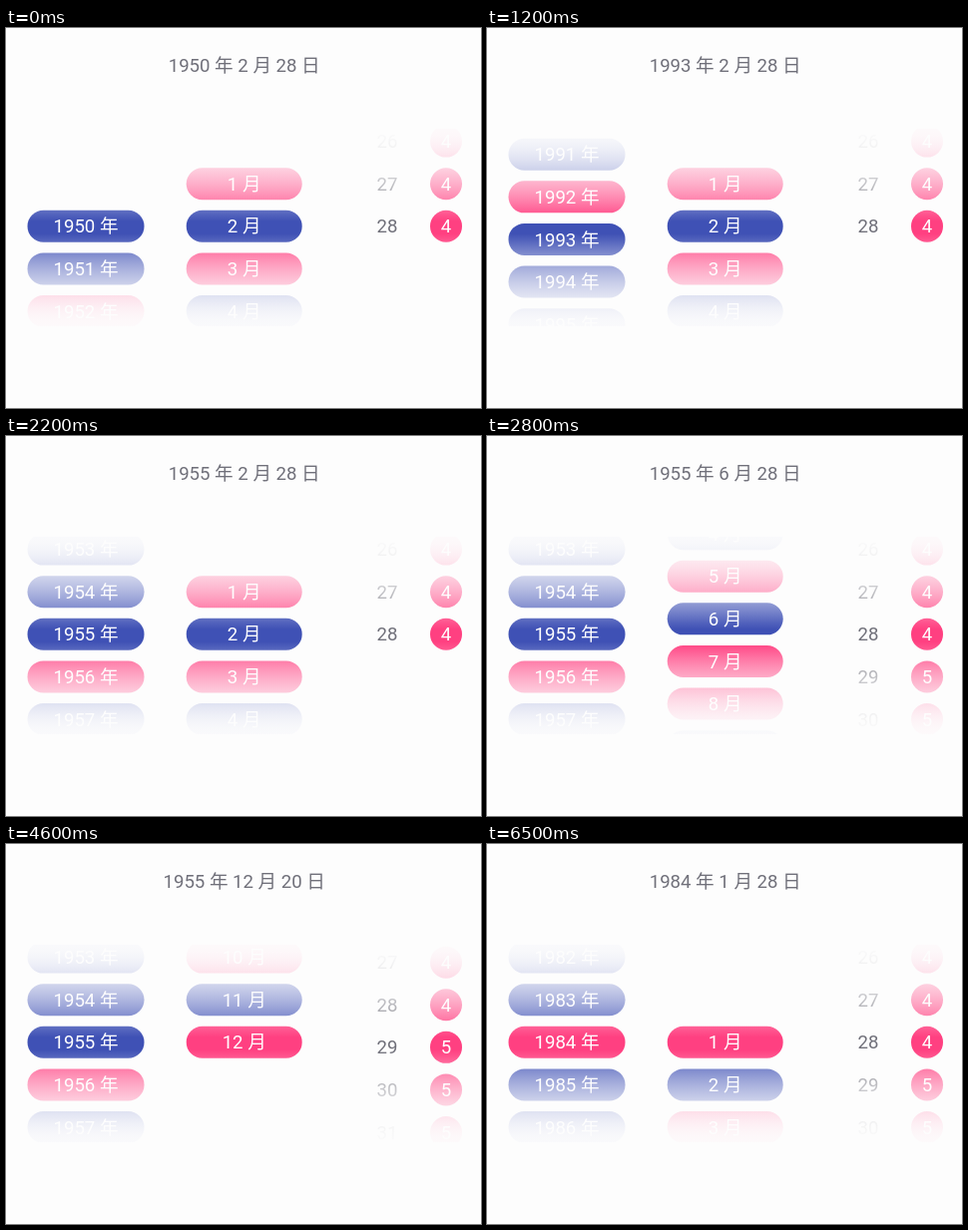
These frames come from a looping animation (476 by 381 pixels, 6.6 s). An HTML page with a canvas:

```html
<!DOCTYPE html>
<html lang="zh-CN">
<head>
<meta charset="utf-8">
<title>日期选择</title>
<style>
html, body { margin: 0; width: 100%; height: 100%; overflow: hidden; background: #fdfdfd; }
canvas { display: block; }
</style>
</head>
<body>
<canvas id="stage" width="476" height="381"></canvas>
<script>
const ctx = document.getElementById('stage').getContext('2d');
const LOOP = 6600, STEP = 100, FLING = 420;
const MID = 198.8, PITCH = 42.6, TOP = 101, HEIGHT = 198, CENTER = 238.7;
const BG = '#fdfdfd', INK = '#70707a', PINK = '#ff4081', BLUE = '#3f51b5';

// Every fling lasts equally long: start ms -> value it settles on
const wheels = {
  year: { from: 1950, flings: { 80: 1971, 620: 1993, 1160: 1976, 1664: 1955, 5357: 1969, 5850: 1984 } },
  month: { from: 2, flings: { 2240: 6, 2727: 12, 4860: 1 } },
  day: { from: 28, flings: { 3790: 20, 4214: 29, 4660: 28 } }
};

const ease = u => u < 0.5 ? 2 * u * u : 1 - 2 * (1 - u) ** 2;
const daysIn = (y, m) => new Date(y, m, 0).getDate();
const isLeap = y => daysIn(y, 2) === 29;

// Current scroll position and the last settled value
function read({ from, flings }, t) {
  let value = from;
  for (const [start, to] of Object.entries(flings)) {
    const u = (t - start) / FLING;
    if (u < 0) break;
    if (u < 1) return { value, pos: value + (to - value) * ease(u) };
    value = to;
  }
  return { value, pos: value };
}

function text(str, x, y, color) {
  ctx.fillStyle = color;
  ctx.fillText(str, x, y + 6.6);
}

function pill(x, y, w, color) {
  ctx.fillStyle = color;
  ctx.beginPath();
  ctx.roundRect(x - w / 2, y - 16, w, 32, 16);
  ctx.fill();
}

function column(pos, min, max, drawRow) {
  const first = Math.max(min, Math.floor(pos) - 3);
  const last = Math.min(max, Math.ceil(pos) + 3);
  for (let n = first; n <= last; n++) drawRow(n, MID + (n - pos) * PITCH);
}

// Veil that hides rows with growing distance from the middle
const veil = ctx.createLinearGradient(0, TOP, 0, TOP + HEIGHT);
for (let s = 0; s <= 1; s += 1 / 32) {
  const u = Math.max(0, Math.abs(2 * s - 1) * 1.08 - 0.08);
  veil.addColorStop(s, `rgba(253,253,253,${0.98 * (1 - (1 - u) ** 1.8)})`);
}

function draw(t) {
  const year = read(wheels.year, t);
  const month = read(wheels.month, t);
  const day = read(wheels.day, t);

  ctx.fillStyle = BG;
  ctx.fillRect(0, 0, 476, 381);
  ctx.font = '18.6px Roboto, "Noto Sans CJK SC", "Noto Sans CJK", sans-serif';
  ctx.textAlign = 'center';
  text(`${year.value} 年 ${month.value} 月 ${day.value} 日`, CENTER, 37.2, INK);

  ctx.save();
  ctx.beginPath();
  ctx.rect(0, TOP, 476, HEIGHT);
  ctx.clip();
  column(year.pos, 1950, 2050, (n, y) => {
    pill(80, y, 117, isLeap(n) ? PINK : BLUE);
    text(`${n} 年`, 80, y, '#fff');
  });
  column(month.pos, 1, 12, (n, y) => {
    pill(CENTER, y, 116, daysIn(2001, n) === 31 ? PINK : BLUE);
    text(`${n} 月`, CENTER, y, '#fff');
  });
  column(day.pos, 1, daysIn(year.value, month.value), (n, y) => {
    text(n, 382, y, INK);
    pill(441, y, 32, PINK);
    text(Math.ceil(n / 7), 441, y, '#fff');
  });
  ctx.fillStyle = veil;
  ctx.fillRect(0, TOP, 476, HEIGHT);
  ctx.restore();
}

const began = performance.now();
function tick() {
  const t = (performance.now() - began) % LOOP;
  draw(Math.floor(t / STEP) * STEP);
  requestAnimationFrame(tick);
}
tick();
</script>
</body>
</html>
```
